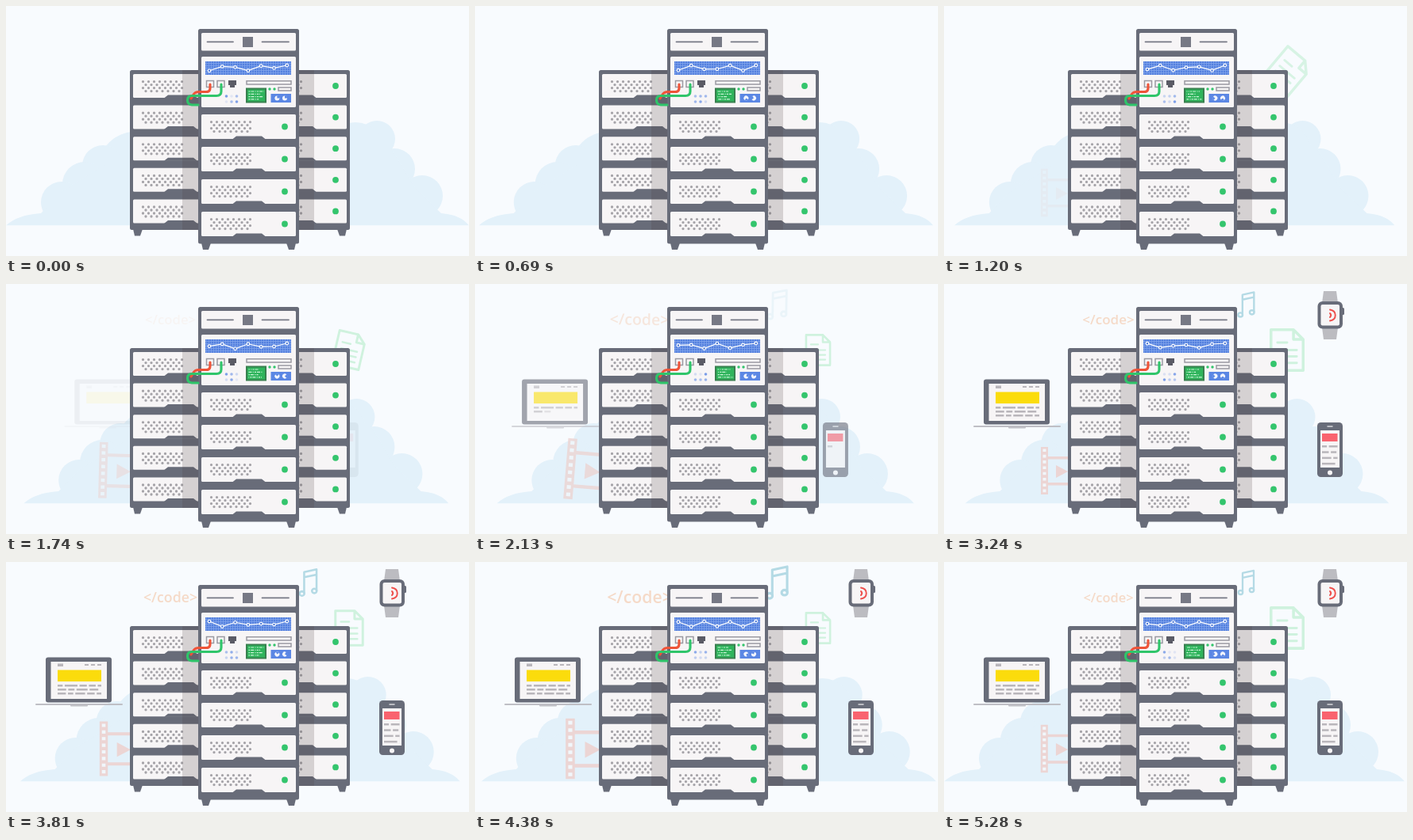
Write an HTML page that moves like this. It is 583 px wide and 316 px high and loops after 8 s.

```html
<!DOCTYPE html>
<html lang="en">
<head>
<meta charset="utf-8">
<title>Server rack</title>
<style>
  html, body { margin: 0; width: 100%; height: 100%; overflow: hidden; background: #f8fbfe; }
  svg { display: block; width: 583px; height: 316px; }
  .frame { fill: #686c79; }
  .panel { fill: #f7f5f6; }
  .cloud { fill: #e3f1fa; }
  .led { fill: #34c56d; }
  .line { fill: none; stroke-linecap: round; stroke-linejoin: round; }
  .holes { stroke: #a5a3a8; stroke-width: 3.3; stroke-dasharray: 0 7; }
  .copy { fill: #b9b6bb; }
  #code text { font: 600 19px "Open Sans", "Noto Sans", sans-serif; fill: #f5dac8; text-anchor: middle; }
</style>
</head>
<body>
<svg viewBox="0 0 583 316">
  <defs>
    <clipPath id="ground"><rect x="-40" width="660" height="277.5"/></clipPath>
    <pattern id="grid" width="3" height="3" patternUnits="userSpaceOnUse">
      <rect width="3" height="3" fill="#5480de"/>
      <path d="M0 .5H3M.5 0V3" stroke="#83a5ec" stroke-width=".7"/>
    </pattern>
  </defs>

  <g clip-path="url(#ground)" class="cloud">
    <g id="cloudL">
      <circle cx="162" cy="204" r="45"/><circle cx="122" cy="202" r="26"/>
      <circle cx="99" cy="225" r="28"/><circle cx="70" cy="248" r="26"/>
      <path d="M0 277.5Q14 264 44 262L70 235 125 200H240V277.5Z"/>
    </g>
    <g id="cloudR">
      <circle cx="467" cy="168" r="23"/><circle cx="440" cy="185" r="38"/>
      <circle cx="489" cy="206" r="26"/><circle cx="524" cy="240" r="26"/>
      <path d="M583 277.5Q573 264 548 262L515 230 485 180H380V277.5Z"/>
    </g>
  </g>

  <g id="code"><text y="6">&lt;/code&gt;</text></g>
  <g id="note" class="line" stroke="#b4dae5" stroke-width="2.3">
    <path d="M-5 12V-12L9 -15V9M-5 -6L9 -9"/>
    <ellipse cx="-7.5" cy="12.5" rx="2.7" ry="2.5"/><ellipse cx="6.5" cy="9.5" rx="2.7" ry="2.5"/>
  </g>
  <g id="doc" class="line" stroke="#cff2de" stroke-width="2.6">
    <path d="M-15 -19H6L15 -10V19H-15ZM6 -19V-10H15"/>
    <path d="M-9 -7H0M-9 0H9M-9 6H9M-9 12H9" stroke-width="2.2"/>
  </g>
  <g id="film">
    <path d="M-28 -30H-19V-18H20V-14.5H-19V15H20V18.5H-19V30H-28Z" fill="#ecd5d4"/>
    <path d="M-23.5 -27.5V30" stroke="#f1f7fb" stroke-width="4" stroke-dasharray="3.6 3.7"/>
    <path d="M-9 -7L6 1-9 9Z" fill="#ecd5d4"/>
  </g>

  <g id="laptop">
    <rect class="frame" x="50" y="120.5" width="83" height="57" rx="3"/>
    <rect class="panel" x="56.5" y="126" width="70.500" height="47"/>
    <path class="copy" d="M65 128.5h7v3.5h-7zM99 129h5v2h-5zM107 129h5v2h-5zM115 129h5v2h-5z"/>
    <rect x="65" y="136.5" width="55" height="14.5" fill="#fbdc0c"/>
    <g id="pageText" class="copy"></g>
    <path d="M38 180H146M82 181.500H102" class="line" stroke="#bfbfc5" stroke-width="2"/>
  </g>

  <g id="phone">
    <rect class="frame" x="470" y="175" width="32" height="69" rx="4.5"/>
    <rect class="panel" x="474" y="185" width="24" height="47"/>
    <path class="line" d="M483 180H489" stroke="#d8d8dc" stroke-width="1.5"/>
    <circle class="panel" cx="486" cy="238.5" r="3"/>
    <rect x="476" y="189" width="19.5" height="10" fill="#f9636f"/>
    <g id="phoneText" class="copy"></g>
  </g>

  <g id="watch">
    <path d="M478 9H494L496 24H476ZM476 55H496L494 70H478Z" fill="#bcbcc1"/>
    <rect class="frame" x="500" y="30" width="4" height="9" rx="1.5"/>
    <rect class="frame" x="470.5" y="22" width="31.5" height="34.5" rx="6"/>
    <rect class="panel" x="474.5" y="26" width="23.5" height="26.5" rx="2"/>
    <circle id="ring" class="line" cx="486" cy="39" r="3.6" stroke="#ee4f4c" stroke-width="2"/>
    <path id="waves" class="line" d="M486 37Q488.5 39.5 486 42M486 32.5C495 34 495 45 486 46.5" stroke="#ee4f4c" stroke-width="1.9"/>
  </g>

  <g id="racks"></g>

  <g id="console">
    <rect class="panel" x="246" y="34" width="119" height="22.5" rx="1.5"/>
    <path class="line" d="M253.5 45.3H286M322.5 45.3H356" stroke="#777985" stroke-width="1.8"/>
    <rect x="298" y="39" width="13" height="13" fill="#777985"/>
    <rect class="panel" x="246" y="64" width="119" height="64" rx="1.5"/>
    <rect x="251" y="70" width="108" height="17" fill="url(#grid)"/>
    <g id="chart"></g>
    <path class="panel" d="M252.5 94.5h9v8h-9zM266 94.5h9v8h-9zM303 94.8h56v4.2h-56zM343 103h16v4h-16z" stroke="#9b9aa2" stroke-width="1.5"/>
    <path d="M280 94h10v6h-2v3h-6v-3h-2z" fill="#5a5b65"/>
    <circle class="led" cx="332" cy="105" r="1.7"/><circle class="led" cx="338" cy="105" r="1.7"/>
    <g id="lamps" fill="#5b87e4"></g>
    <rect x="303" y="104.500" width="24" height="17" fill="#2fb45c" stroke="#38804f" stroke-width="2"/>
    <g id="readout" stroke="#c9f3d6" stroke-width="1.2" stroke-dasharray="2 1 4 1.4 1 1.2"></g>
    <rect x="333.5" y="111" width="25.5" height="11" fill="#5b87e4"/>
    <g id="dials" fill="#f2f5fd"></g>
    <g class="line" stroke-width="3.1">
      <path d="M257 99V104Q257 108.5 252 108.5H243Q238 108.5 236 112L233 117" stroke="#ef5439"/>
      <path d="M271 99V108Q271 113.5 265 113.5H234Q228.5 113.5 228.5 119T234 125H242" stroke="#2fc56a"/>
    </g>
  </g>
</svg>

<script>
const LOOP = 8000, STOP = 5280, STEP = 30, TAU = 2 * Math.PI;
const $ = id => document.getElementById(id);
const range = n => [...Array(n).keys()];
const clamp = v => Math.max(0, Math.min(1, v));
const ramp = (t, start, end) => clamp((t - start) / (end - start));
// Swings between 0 and 1, reaching 1 at the peak time.
const swing = (t, peak, period) => (1 + Math.cos(TAU * (t - peak) / period)) / 2;
// One single swing around the peak time.
const bell = (t, peak, width) => Math.abs(t - peak) < width / 2 ? swing(t, peak, width) : 0;

// Racks
function unit(x, y, h) {
  const rows = range(4).map(i => {
    const odd = i % 2;
    return `<path class="line holes" d="M${x + 12.5 + odd * 3.5} ${y + 9.6 + i * 4}h${49.1 - odd * 7}"/>`;
  }).join("");
  const b = y + h;
  return `<rect class="panel" x="${x}" y="${y}" width="119" height="${h}" rx="1.5"/>${rows}
    <path class="frame" d="M${x + 39} ${b + .5}L${x + 44} ${b - 3.5}H${x + 76}L${x + 81} ${b + .5}Z"/>
    <circle class="led" cx="${x + 105}" cy="${y + h / 2}" r="3.9"/>`;
}
function rack(x, top, bottom, first, count, pitch, h) {
  const foot = (a, s) => `<path class="frame" d="M${a} ${bottom - 1}h${12 * s}l${-3 * s} 8.5h${-7 * s}z"/>`;
  return foot(x + 4, 1) + foot(x + 123, -1) +
    `<rect class="frame" x="${x}" y="${top}" width="127" height="${bottom - top}" rx="2.5"/>` +
    range(count).map(i => unit(x + 4, first + i * pitch, h)).join("");
}
const sideRack = x => rack(x, 81, 283, 86, 5, 39.6, 30);
const shade = (x, w) => `<rect x="${x}" y="81" width="${w}" height="202" fill="#4a4144" opacity=".2"/>`;
$("racks").innerHTML = sideRack(156) + sideRack(306) + shade(222, 20) + shade(369, 19) +
  rack(242, 29, 300.5, 137, 4, 41, 31);

// Rows of random words on the small screens
function random(seed) {
  return () => (seed = seed * 16807 % 2147483647) / 2147483647;
}
function fillCopy(id, left, top, width, rows, pitch, seed) {
  const next = random(seed);
  let out = "";
  for (let r = 0; r < rows; r++) {
    for (let x = left; x < left + width - 4;) {
      const w = Math.min(6 + next() * 11, left + width - x);
      out += `<rect x="${x}" y="${top + r * pitch}" width="${w}" height="2.5"/>`;
      x += w + 2.6;
    }
  }
  $(id).innerHTML = out;
}
fillCopy("pageText", 65, 155, 55, 3, 5, 4021);
fillCopy("phoneText", 476, 204, 19.5, 4, 7.3, 977);
function type(id, p) {
  const words = [...$(id).children];
  words.forEach((word, i) => word.setAttribute("opacity", clamp(p * words.length - i)));
}

function drawChart(t) {
  const pts = range(7).map(i => {
    const y = i < 6 ? 78.4 + 3.4 * Math.cos(TAU * t / (7200 - i * 700) + i * 2.2) : 75;
    return [256 + i * 16.3, y];
  });
  $("chart").innerHTML =
    `<polyline points="${pts.join(" ")}" fill="none" stroke="#fff" stroke-width="1.2"/>` +
    pts.map(([x, y]) => `<circle cx="${x}" cy="${y}" r="1.8" fill="#4c78d6" stroke="#fff" stroke-width="1.2"/>`).join("");
}

function drawConsole(t) {
  $("lamps").innerHTML = range(6).map(i => {
    const glow = .12 + .68 * swing(t, i * 470, 900 + i % 3 * 160);
    return `<circle cx="${277.5 + i % 3 * 6.5}" cy="${i < 3 ? 114 : 121}" r="1.8" opacity="${glow}"/>`;
  }).join("");
  $("readout").innerHTML = range(4).map(i => {
    const shift = Math.floor(t / 150) * (i + 2) * 1.7;
    const end = 325 - (i * 5 + Math.floor(t / 300) * 3) % 9;
    return `<path d="M305.500 ${108 + i * 3.3}H${end}" stroke-dashoffset="${shift}"/>`;
  }).join("");
  $("dials").innerHTML = [-1, 1].map(s =>
    `<g transform="translate(${346.2 + s * 4.8} 116.5) rotate(${-s * t * .18})">` +
    `<circle r="3"/><path d="M0 0V-3.2A3.2 3.2 0 0 1 3.2 0Z" fill="#5b87e4"/></g>`).join("");
}

function place(id, x, y, scale, turn, opacity) {
  $(id).setAttribute("transform", `translate(${x} ${y}) rotate(${turn}) scale(${scale})`);
  $(id).setAttribute("opacity", opacity);
}
// Slides out from behind the racks with a quadratic ease-out, fading in faster.
function slide(id, t, start, end, from) {
  place(id, from * (1 - ramp(t, start, end)) ** 2, 0, 1, 0, ramp(t, start, start + 750));
}

function draw(t) {
  place("cloudL", 30 * swing(t, STOP / 2, STOP), 0, 1, 0, 1);
  place("cloudR", -31 * swing(t, 2400, 4800), 0, 1, 0, 1);

  const tilt = bell(t, 2520, 1000);
  place("code", 207, 45.5, .86 + .26 * swing(t, 2520, 1900), 7 * tilt, ramp(t, 1560, 2500));
  place("note", 381, 26, 1 + .34 * swing(t, 2500, 1880), 10 * tilt, ramp(t, 1900, 3100));
  place("doc", 432, 83.5, 1 + .35 * swing(t, 3240, 2080), 58 * (1 - ramp(t, 840, 2000)), ramp(t, 840, 1300));
  place("film", 150, 236, 1 + .28 * swing(t, 2180, 2150), 5 * bell(t, 2050, 1000), ramp(t, 900, 2400));

  slide("laptop", t, 1680, 2520, 42);
  slide("phone", t, 1680, 3250, -63);
  slide("watch", t, 2130, 3200, -30);
  type("pageText", ramp(t, 1850, 2450));
  type("phoneText", ramp(t, 2000, 3100));
  const pulse = ramp(t, 2770, 2950);
  $("ring").setAttribute("opacity", 1 - pulse);
  $("waves").setAttribute("opacity", pulse);

  drawChart(t);
  drawConsole(t);
}

function tick() {
  const t = performance.now() % LOOP;
  draw(Math.min(STOP, Math.floor(t / STEP) * STEP));
  requestAnimationFrame(tick);
}
tick();
</script>
</body>
</html>
```
